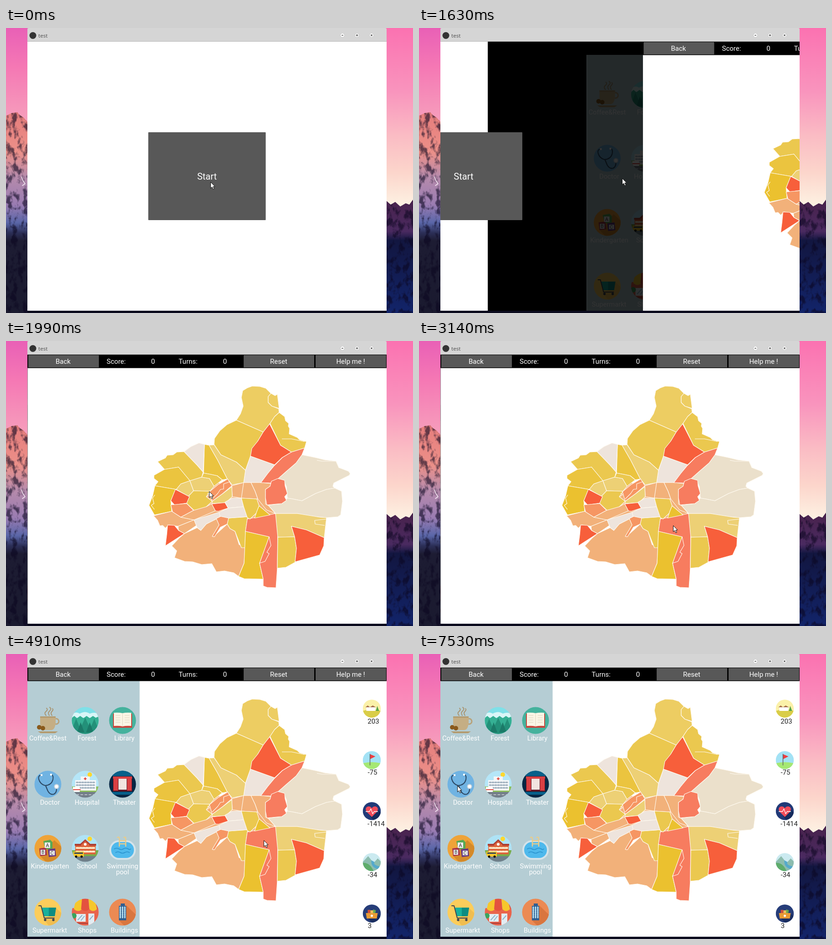
These frames come from a looping animation (894x626 px, 8 s). An HTML page:

```html
<!DOCTYPE html>
<html lang="en">
<head>
<meta charset="utf-8">
<title>test</title>
<style>
@property --slide { syntax: '<number>'; inherits: true; initial-value: 0; }
@property --open { syntax: '<number>'; inherits: true; initial-value: 0; }
html, body { margin: 0; width: 100%; height: 100%; overflow: hidden; }
svg { display: block; width: 894px; height: 626px; animation: slide 8s step-end infinite, open 8s step-end infinite; }
text { font: 15px Roboto, sans-serif; text-anchor: middle; fill: #fff; }
.title { font: 11.5px 'Noto Sans', sans-serif; text-anchor: start; fill: #555; }
.big { font-size: 20px; }
.labels text { font-size: 14.7px; }
.stats text { fill: #222; }
.btn { fill: #585858; }
.disc { clip-path: url(#disc); }
.small { clip-path: url(#smallDisc); }
.line { fill: none; stroke-linecap: round; stroke-linejoin: round; }

.map path { stroke: #fffaf0; stroke-width: 1.15; stroke-linejoin: round; }
.a { fill: #edcd62 } .b { fill: #ebc84f } .c { fill: #ebc12f } .d { fill: #edd075 }
.e { fill: #f2b17a } .f { fill: #f75f3b } .g { fill: #f77c5f } .h { fill: #f69663 }
.i { fill: #eee4dc } .j { fill: #ebe0cb } .k { fill: #ebc43f } .seam { fill: none }

.startBack { transform: translateX(calc(var(--slide) * -1571px)); }
.startButton { transform: translateX(calc(var(--slide) * -788px)); }
.game { transform: translateX(calc((1 - var(--slide)) * 788px)); opacity: calc(var(--slide) * 1000); }
.drawer { transform: translateX(calc((var(--open) - 1) * 123px)); }
.shade { opacity: calc((1 - var(--open)) * .8); }
.page { transform: translateX(calc(var(--open) * 246px)); }
.press { animation: press 8s step-end infinite; }
.bubble { animation: bubble 8s step-end infinite; }
.stats { animation: stats 8s step-end infinite; }
.cursor { animation: cursor 8s step-end infinite; }

@keyframes slide {
  0% { --slide: 0 } 19.375% { --slide: .0975 } 20.375% { --slide: .436 } 21.375% { --slide: .6975 }
  22.25% { --slide: .859 } 23.125% { --slide: .96 } 24% { --slide: .9994 } 24.875%, 100% { --slide: 1 }
}
@keyframes open {
  0% { --open: 0 } 56.625% { --open: .004 } 57.625% { --open: .51 } 58.625% { --open: .805 }
  59.5% { --open: .94 } 60.5% { --open: .994 } 61.375%, 100% { --open: 1 }
}
@keyframes press { 0% { fill: #585858 } 17.625% { fill: #32a4ce } 19.375%, 100% { fill: #585858 } }
@keyframes bubble { 0% { opacity: 0 } 41% { opacity: 1 } 57.625%, 100% { opacity: 0 } }
@keyframes stats { 0% { opacity: 0 } 57.625%, 100% { opacity: 1 } }
@keyframes cursor {
  0% { transform: translate(449px, 338px) }
  2.875% { transform: translate(470px, 322px) }
  3.75% { transform: translate(530px, 290px) }
  4.625% { transform: translate(590px, 283px) }
  5.625% { transform: translate(621px, 320px) }
  6.5% { transform: translate(615px, 375px) }
  7.375% { transform: translate(575px, 403px) }
  8.25% { transform: translate(535px, 400px) }
  13.125% { transform: translate(517px, 386px) }
  14% { transform: translate(490px, 362px) }
  14.875% { transform: translate(465px, 343px) }
  15.75% { transform: translate(450px, 333px) }
  16.625% { transform: translate(446px, 330px) }
  35.625% { transform: translate(452px, 336px) }
  36.5% { transform: translate(470px, 350px) }
  37.375% { transform: translate(500px, 372px) }
  38.375% { transform: translate(535px, 393px) }
  39.25% { transform: translate(558px, 405px) }
  40.125% { transform: translate(566px, 409px) }
  76.625% { transform: translate(560px, 418px) }
  77.5% { transform: translate(535px, 445px) }
  78.5% { transform: translate(495px, 478px) }
  79.375% { transform: translate(445px, 500px) }
  80.375% { transform: translate(385px, 508px) }
  81.25% { transform: translate(310px, 495px) }
  82.125% { transform: translate(235px, 452px) }
  83.125% { transform: translate(170px, 395px) }
  84% { transform: translate(120px, 335px) }
  85% { transform: translate(88px, 290px) }
  85.875% { transform: translate(72px, 271px) }
  86.875% { transform: translate(67px, 262px) }
  87.75% { transform: translate(66px, 260px) }
  88.625% { transform: translate(74px, 266px) }
  89.625% { transform: translate(88px, 276px) }
  90.5% { transform: translate(100px, 287px) }
  91.375% { transform: translate(103px, 296px) }
  92.25% { transform: translate(97px, 294px) }
  93.25% { transform: translate(89px, 291px) }
  94.125%, 100% { transform: translate(84px, 289px) }
}
</style>
</head>
<body>
<svg viewBox="0 0 894 626">
<defs>
  <clipPath id="disc"><circle r="29.5"/></clipPath>
  <clipPath id="smallDisc"><circle r="19.8"/></clipPath>
  <clipPath id="window"><path d="M47 30H836V621H47Z"/></clipPath>
  <linearGradient id="skyLeft" x2="0" y2="1"><stop stop-color="#e960b6"/><stop offset=".4" stop-color="#f578b4"/><stop offset="1" stop-color="#f6a2bd"/></linearGradient>
  <linearGradient id="skyRight" x2="0" y2="1"><stop stop-color="#fb72b1"/><stop offset=".35" stop-color="#f994bd"/><stop offset=".6" stop-color="#fabcc4"/><stop offset=".8" stop-color="#fcd5cb"/><stop offset="1" stop-color="#fdf3e4"/></linearGradient>
  <linearGradient id="rockLeft" x2="0" y2="1"><stop stop-color="#e67d7c"/><stop offset=".2" stop-color="#ec9089"/><stop offset=".32" stop-color="#b78bab"/><stop offset=".46" stop-color="#9a7cb2"/><stop offset=".55" stop-color="#5a66a8"/><stop offset=".6" stop-color="#2c2f58"/><stop offset=".64" stop-color="#1d1c33"/><stop offset="1" stop-color="#1a1a2f"/></linearGradient>
  <linearGradient id="rockRight" x2="0" y2="1"><stop stop-color="#49224c"/><stop offset=".28" stop-color="#4a2a60"/><stop offset=".36" stop-color="#121640"/><stop offset="1" stop-color="#12246a"/></linearGradient>
  <filter id="rough" x="0" y="0" width="1" height="1" color-interpolation-filters="sRGB">
    <feTurbulence type="fractalNoise" baseFrequency=".08 .05" numOctaves="4" seed="4"/>
    <feColorMatrix values="0 0 0 0 .04  0 0 0 0 .02  0 0 0 0 .12  5 0 0 0 -2.400"/>
    <feComposite in2="SourceGraphic" operator="in" result="cracks"/>
    <feComponentTransfer in="cracks" result="shadow"><feFuncA type="linear" slope=".6"/></feComponentTransfer>
    <feMerge><feMergeNode in="SourceGraphic"/><feMergeNode in="shadow"/></feMerge>
  </filter>
</defs>

<path fill="#0b0b1e" d="M0 0H894V626H0Z"/>
<path fill="url(#skyLeft)" d="M0 0H60V215H0Z"/>
<path fill="url(#skyRight)" d="M826 0H894V395H826Z"/>
<g filter="url(#rough)">
  <path fill="url(#rockLeft)" d="M0 193L12 187L25 185L30 191L39 197L47 206V626H0Z"/>
  <path fill="url(#rockRight)" d="M836 380L845 388L855 382L866 392L878 385L886 388L894 377V626H836Z"/>
</g>
<path class="line" stroke="#f4e6f2" stroke-width="1.600" d="M34 327L37 335L42 342L36 346"/>

<path fill="#d5d5d5" d="M47 30V3Q47 0 50 0H833Q836 0 836 3V30Z"/>
<path fill="#b9b9b9" d="M47 29H836V30H47Z"/>
<circle cx="59" cy="16.500" r="7.500" fill="#333"/>
<text class="title" x="71" y="21">test</text>
<g fill="#fff" stroke="#aaa" stroke-width=".5"><circle cx="739" cy="16" r="4.400"/><circle cx="771" cy="16" r="4.400"/><circle cx="803" cy="16" r="4.400"/></g>
<path class="line" stroke="#555" stroke-width="1.300" d="M737.500 16H740.500M769 16H773M771 14V18M801.700 14.700L804.300 17.300M804.300 14.700L801.700 17.300"/>

<g clip-path="url(#window)">
<path d="M47 30H836V621H47Z"/>
<path class="startBack" fill="#fff" d="M47 30H836V621H47Z"/>
<g class="startButton">
  <rect class="btn press" x="312.500" y="229" width="258" height="193" rx="1"/>
  <text class="big" x="441.500" y="332.500">Start</text>
</g>

<g class="game">
<g class="drawer">
  <path fill="#b5cdd4" d="M47 59H294V621H47Z"/>
  <g transform="translate(92 146)">
    <path class="line" stroke="#a8906a" stroke-width="1.800" d="M-4-11Q-9-16-4-20T-3-27M3-11Q-1-17 4-21T4-29M9-11Q5-16 9-20T10-26"/>
    <circle cx="18" cy="2" r="6" fill="none" stroke="#b8a27a" stroke-width="3"/>
    <path fill="#c5ae84" d="M-17-9H17V4Q16 20 8 21H-8Q-17 19-17 4Z"/><path fill="#b39b70" d="M-17-9H17V-6H-17ZM-22 24H22L16 28H-16Z"/>
    <g fill="#8a5a1c"><circle cx="-19" cy="15" r="5"/><circle cx="-11" cy="17" r="5"/></g>
  </g>
  <g class="disc" transform="translate(174 146)">
    <path fill="#7fe0e8" d="M-30-30H30V30H-30Z"/><path fill="#d9f6f7" d="M-30-13Q-20-21-12-15Q0-22 10-15Q22-20 30-13V-6H-30Z"/>
    <path fill="#35b094" d="M-30-5L-24-10L-18-5L-11-10L-4-5L3-10L10-5L17-10L23-6L30-9V30H-30Z"/>
    <path fill="#239079" d="M-30 22L-20-4L-11 18L0-6L11 18L20-4L30 22V30H-30Z"/>
    <path fill="#1b7a68" d="M-18 26L-10 4L-2 26ZM2 26L10 4L18 26Z"/>
  </g>
  <g class="disc" transform="translate(256 146)">
    <path fill="#45b29d" d="M-30-30H30V30H-30Z"/><path fill="#c9463d" d="M-21-15H21V16H-21Z"/>
    <path fill="#fbf6e6" d="M-19-17Q-8-18 0-16Q8-18 19-17V12Q8 11 0 13Q-8 11-19 12Z"/>
    <path class="line" stroke="#ddd3bc" d="M0-15V13M-15-11H-5M-15-6H-5M-15-1H-5M-15 4H-5M5-11H15M5-6H15M5-1H15M5 4H15"/>
  </g>
  <g class="disc" transform="translate(92 286)">
    <path fill="#70b3e2" d="M-30-30H30V30H-30Z"/>
    <path class="line" stroke="#2d4a66" stroke-width="2.200" d="M-15-20Q-22-19-20-11Q-17 0-6 3Q8 2 11-10Q13-20 7-21M-5 3Q-3 8 0 15Q5 24 13 22Q19 19 19 11"/>
    <circle cx="19" cy="5" r="4.500" fill="#fff" stroke="#c9d5de" stroke-width="2"/>
    <path fill="#fff" d="M-16-22H-12V-18H-16ZM5-23H9V-19H5Z"/>
  </g>
  <g class="disc" transform="translate(174 286)">
    <path fill="#b5e6f8" d="M-30-30H30V30H-30Z"/><circle cx="10" cy="-21" r="5" fill="#ffd72e"/>
    <path fill="#8fc05c" d="M-30 5H30V18H-30Z"/><path fill="#737e89" d="M-30 17H30V30H-30Z"/>
    <path fill="#f4f6f8" d="M-10-17H10V14H-10ZM-22-9H24V14H-22Z"/>
    <path class="line" stroke="#9aabba" stroke-width="3" stroke-dasharray="3 3" stroke-linecap="butt" d="M-19-4H22M-19 2H22M-19 8H22"/>
    <path fill="#e2483f" d="M-1-15H1V-13H3V-11H1V-9H-1V-11H-3V-13H-1Z"/>
    <path fill="#fff" d="M-27 6H-12V17H-27Z"/><path fill="#e2483f" d="M-27 11H-10V13H-27Z"/>
    <path class="line" stroke="#fff" stroke-dasharray="5 4" d="M-28 23H28"/>
  </g>
  <g class="disc" transform="translate(256 286)">
    <path fill="#062744" d="M-30-30H30V30H-30Z"/><path fill="#07608a" d="M-30-30H30V-18H-30ZM-30 17H30V23H-30Z"/>
    <path fill="#5c1726" d="M-21-15H21V16H-21Z"/><path fill="#f2e4e0" d="M-9-12H9V12H-9Z"/>
    <path fill="#d83f43" d="M-21-17H21V-12H-21ZM-20-12H-10V14H-20ZM10-12H20V14H10Z"/>
  </g>
  <g class="disc" transform="translate(92 427)">
    <path fill="#efa338" d="M-30-30H30V30H-30Z"/><path fill="#d58a29" d="M14-18L34 0V34H0L-16 18Z"/>
    <path fill="#58a955" d="M-10-16L5-19L10-14V1L-6 2Z"/><path fill="#a5364c" d="M-19 0L-4-2L-2 15L-17 17Z"/><path fill="#643984" d="M0 2L16 0L18 17L2 19Z"/>
    <path fill="#eee" d="M-7-13H5V-1H-7ZM-16 3H-6V14H-16ZM4 5H15V15H4Z"/>
    <text y="-3" x="-1" style="font-size:11px;fill:#333">A</text><text y="12" x="-11" style="font-size:10px;fill:#333">B</text><text y="14" x="9" style="font-size:10px;fill:#333">C</text>
  </g>
  <g class="disc" transform="translate(174 427)">
    <path fill="#aee3f6" d="M-30-30H30V30H-30Z"/><circle cx="10" cy="-21" r="5" fill="#ffd72e"/><path fill="#77ad4b" d="M-30 4H30V18H-30Z"/>
    <path fill="#dd653c" d="M-22-7H23V13H-22ZM-9-11L0-18L9-11V13H-9Z"/><path fill="#ad3f33" d="M-23-10H-9V-6H-23ZM9-10H24V-6H9ZM-11-10L0-20L11-10L9-8L0-16L-9-8Z"/>
    <path class="line" stroke="#fbe9c9" stroke-width="4" stroke-dasharray="4 3" stroke-linecap="butt" d="M-19-1H20M-19 7H20"/><circle cy="-9" r="3" fill="#fff"/>
    <path fill="#70808a" d="M-30 17H30V30H-30Z"/><path fill="#f9c72b" d="M-26 7H-3V18H-26Z"/><path fill="#394c5c" d="M-24 9H-5V12H-24Z"/>
    <circle cx="-20" cy="18" r="2.500"/><circle cx="-8" cy="18" r="2.500"/>
  </g>
  <g transform="translate(256 427)">
    <rect x="-29" y="-18" width="58" height="43" rx="21" fill="#d4e3ea"/><rect x="-25" y="-14" width="50" height="35" rx="17" fill="#4fb9ec"/>
    <path class="line" stroke="#2790cc" stroke-width="1.500" d="M-18 1Q-13-2-8 1T2 1T12 1T18 1M-15 9Q-10 6-5 9T5 9T15 9"/>
    <path class="line" stroke="#e8cc8a" stroke-width="2.500" d="M-7-5V-22Q-7-26-11-24M7-5V-22Q7-26 3-24M-7-17H7M-7-10H7"/>
  </g>
  <g class="disc" transform="translate(92 567)">
    <path fill="#fccd5b" d="M-30-30H30V30H-30Z"/><path fill="#f0bd50" d="M18-9L40 12V40H10L-8 17Z"/>
    <path fill="#18b09c" d="M-13-10H18L15 9H-9Z"/><path fill="#0d8c81" d="M2-10H18L15 9H2Z"/>
    <path class="line" stroke="#3d4450" stroke-width="2" d="M-20-14H-15L-8 13H14"/><circle cx="-6" cy="17" r="2.700" fill="#3d4450"/><circle cx="12" cy="17" r="2.700" fill="#3d4450"/>
  </g>
  <g class="disc" transform="translate(174 567)">
    <path fill="#e9644c" d="M-30-9H30V30H-30Z"/><path fill="#f6c72c" d="M-20-30H-7V-7Q-15 2-25-7ZM7-30H20L26-7Q17 2 9-7Z"/><path fill="#e4523f" d="M-7-30H7L9-7Q0 2-9-7ZM20-30H30V-7H26Z"/>
    <path fill="#e2edf3" d="M-20 4H1V21H-20ZM7 3H20V30H7Z"/><path class="line" stroke="#8cb3c9" stroke-width="2" d="M-16 17L-7 7M-9 18L-2 9M10 16L17 8"/>
    <circle cx="-25" cy="8" r="6" fill="#3aa45d"/><path fill="#b8443c" d="M-30 23H6V26H-30Z"/>
  </g>
  <g class="disc" transform="translate(256 567)">
    <path fill="#ec8a53" d="M-30-30H30V30H-30Z"/><path fill="#d9763f" d="M8-15L40 16V40H14L-8 18Z"/>
    <path fill="#315f91" d="M-4-19H5V-14H8V18H-8V-14H-4Z"/><path class="line" stroke="#b9e2f2" stroke-width="3" stroke-dasharray="3 2" stroke-linecap="butt" d="M-5-11V14M0-11V14M5-11V14"/>
  </g>
  <g class="labels">
    <text x="92" y="190">Coffee&amp;Rest</text><text x="178" y="190">Forest</text><text x="260" y="190">Library</text>
    <text x="96.500" y="331">Doctor</text><text x="178" y="331">Hospital</text><text x="260" y="331">Theater</text>
    <text x="96.500" y="471">Kindergarten</text><text x="178" y="471">School</text><text x="256" y="471">Swimming</text><text x="256" y="484">pool</text>
    <text x="96" y="612">Supermarkt</text><text x="178.500" y="612">Shops</text><text x="260" y="612">Buildings</text>
  </g>
  <path class="shade" d="M47 59H294V621H47Z"/>
</g>

<path class="page" fill="#fff" d="M47.500 59H836V621H47.500Z"/>
<path d="M47 30H836V59.500H47Z"/>
<g class="btn"><rect x="49" y="31" width="155" height="27"/><rect x="522" y="31" width="155" height="27"/><rect x="680" y="31" width="155" height="27"/></g>
<text x="125.500" y="50">Back</text><text x="242" y="50">Score:</text><text x="323" y="50">0</text><text x="400" y="50">Turns:</text><text x="481" y="50">0</text><text x="599" y="50">Reset</text><text x="757" y="50">Help me !</text>

<g class="map">
  <path class="e" d="M380 340L440 310L590 320L590 392L530 400L400 395Z"/>
  <path class="a" d="M506 174L515 160L521 143L517 124L520 109L530 103L541 99L558 100L571 104L582 115L576 122L576 135L584 143L599 149L600 157L590 166L580 181L565 200Z"/>
  <path class="a" d="M582 115L591 120L596 117L600 148L584 143L576 135L576 122Z"/>
  <path class="b" d="M600 157L612 166L614 175L621 181L620 187L623 192L622 204L640 212L645 217L660 221L656 235L627 244L603 229L580 181L590 166Z"/>
  <path class="b" d="M506 174L565 200L552 222L537 253L526 284L506 266L472 250L457 227L458 214L470 197L485 184Z"/>
  <path class="f" d="M579 182L603 229L627 244L607 256L590 272L537 253L540 236L553 220L565 200Z"/>
  <path class="i" d="M537 253L590 272L575 291L560 311L522 311L526 284Z"/>
  <path class="j" d="M650 250L670 254L684 257L700 261L725 264L731 278L752 286L756 291L754 295L720 312L718 319L722 323L704 326L680 335L650 351L630 347L618 345L616 320L609 305L597 303L615 287L637 268Z"/>
  <path class="j" d="M722 323L737 330L739 352L735 382L729 386L705 388L660 384L640 379L592 379L576 361L606 357L618 345L630 347L650 351L680 335L704 326Z"/>
  <path class="e" d="M538 311L560 311L582 313L580 320L570 326L570 358L577 362L592 379L572 371L553 347L547 330Z"/>
  <path class="g" d="M656 235L650 250L637 268L615 287L597 303L582 312L560 311L575 291L590 273L607 256L627 244Z"/>
  <path class="g" d="M570 326L580 319L583 308L597 302L612 306L613 318L618 335L612 342L616 350L606 357L573 360L570 345Z"/>
  <path class="d" d="M446 229L457 228L472 250L506 266L526 284L522 311L497 316L486 303L465 262Z"/>
  <path class="k" d="M436 227L446 229L465 262L486 303L475 305L464 296L450 293L434 290Z"/>
  <path class="i" d="M391 243L406 232L424 224L436 227L433 288L420 273Z"/>
  <path class="b" d="M333 265L350 257L354 251L367 250L375 244L391 243L420 273L433 288L430 299L404 307L384 283L379 277L348 282Z"/>
  <path class="k" d="M325 295L348 282L379 277L384 283L404 307L384 314L374 326L327 318L334 309L325 302Z"/>
  <path class="c" d="M327 318L374 326L362 351L364 374L326 382L314 361L322 340Z"/>
  <path class="d" d="M374 326L384 314L404 307L412 329L402 342Z"/>
  <path class="d" d="M404 307L430 299L447 302L457 319L448 330L412 329Z"/>
  <path class="b" d="M434 290L450 293L464 296L475 305L457 319L447 302L430 299Z"/>
  <path class="b" d="M395 347L412 329L448 330L440 342L453 352L440 364L424 373L412 371L397 357Z"/>
  <path class="f" d="M372 326L403 342L397 356L370 360L362 351Z"/>
  <path class="h" d="M362 360L397 357L412 372L384 387L366 376Z"/>
  <path class="e" d="M324 384L364 374L384 387L413 393L378 407L358 404L350 411L344 405L338 406L333 394Z"/>
  <path class="e" d="M384 387L412 372L440 364L452 357L460 373L413 393Z"/>
  <path class="f" d="M355 404L370 405L379 416L392 423L350 450L353 426Z"/>
  <path class="e" d="M378 407L413 393L423 402L392 423L379 416Z"/>
  <path class="e" d="M392 423L420 410L428 416L440 402L462 390L472 397L455 430L486 402L492 412L503 418L512 447L525 454L523 488L511 517L500 509L480 505L462 507L452 489L430 491L410 485L392 484L370 476L375 461L364 450L380 433Z"/>
  <path class="i" d="M413 393L468 376L472 386L440 402L428 416L420 410Z"/>
  <path class="h" d="M462 390L474 384L490 389L486 402L471 409L458 430L453 429L468 404Z"/>
  <path class="b" d="M489 389L531 386L526 418L525 454L517 454L503 418L492 412L486 402Z"/>
  <path class="c" d="M526 418L578 430L571 455L557 488L565 523L523 522L511 517L523 488Z"/>
  <path class="g" d="M530 391L592 379L597 393L596 498L593 542L573 541L565 538L565 523L557 488L578 430L526 418Z"/>
  <path class="d" d="M592 379L640 379L690 387L704 388L699 432L660 415L627 407L634 430L597 431Z"/>
  <path class="b" d="M597 431L634 430L638 455L635 486L615 497L596 499Z"/>
  <path class="f" d="M627 407L660 415L699 432L698 450L689 470L635 485L638 455L634 430Z"/>
  <path class="e" d="M496 318L522 311L538 311L547 330L553 347L517 345L497 342Z"/>
  <path class="h" d="M447 331L465 316L487 303L496 318L475 336L453 352Z"/>
  <path class="d" d="M453 352L475 336L496 320L497 342L483 355L453 357Z"/>
  <path class="f" d="M452 358L481 355L488 367L466 374L460 373Z"/>
  <path class="i" d="M481 354L497 345L517 345L522 364L488 367Z"/>
  <path class="i" d="M468 376L488 367L522 364L531 386L489 389L470 385Z"/>
  <path class="b" d="M517 345L551 347L556 362L550 378L536 391L530 388L522 364Z"/>
  <path class="c" d="M556 362L580 382L546 389L551 374Z"/>
  <path class="seam" d="M578 430L582 449L573 464L578 467L569 484L557 488M704 391L678 394L679 402L700 405M522 311L517 345M453 347L465 335L471 326L478 325L478 314L492 309M440 342L447 338L443 334M327 338L322 345L325 357L319 361L326 370M606 215L627 215L656 221M683 262L694 264L725 264L732 279"/>
</g>

<g class="stats">
  <g class="small" transform="translate(803.500 120)"><path fill="#fbf1a9" d="M-20-20H20V20H-20Z"/><path fill="#d9cd48" d="M-20 5Q0-2 20 5V20H-20Z"/><path fill="#fff" d="M-12-3H8V5H-12Z"/><path fill="#a7704c" d="M-14-3L-9-7L-4-3L2-7L9-3Z"/><path fill="#58a348" d="M9 5L12-6L16 5Z"/></g>
  <g class="small" transform="translate(803.500 233)"><path fill="#a3e2f5" d="M-20-20H20V20H-20Z"/><path fill="#a5e873" d="M-20 7Q0 2 20 7V20H-20Z"/><path fill="#ef3e41" d="M-4-13L8-8L-4-2Z"/><path class="line" stroke="#666" stroke-width="1.500" d="M-4-13V11"/></g>
  <g class="small" transform="translate(803.500 345)"><path fill="#213a78" d="M-20-20H20V20H-20Z"/><path fill="#152b5d" d="M12-5L25 10V25H6L-4 10Z"/><path fill="#f14b59" d="M0 13L-12 1Q-16-7-9-10Q-3-11 0-6Q3-11 9-10Q16-7 12 1Z"/><path class="line" stroke="#fff" stroke-width="1.300" d="M-13 1H-5L-2-5L2 6L5 1H13"/></g>
  <g class="small" transform="translate(803.500 457)"><path fill="#cbeaf0" d="M-20-20H20V20H-20Z"/><path fill="#8cbcae" d="M-20 0L-8-13L4 2L13-8L20-1V20H-20Z"/><path fill="#5fac6c" d="M-20 2Q-5 0 4 20H-20Z"/><path fill="#55a9cc" d="M-1-4L6 0Q2 7 20 10V17Q-3 14-1-4Z"/></g>
  <g class="small" transform="translate(803.500 570)"><path fill="#263d79" d="M-20-20H20V20H-20Z"/><path fill="#192d60" d="M12 0L25 12V25H5L-9 10Z"/><path fill="#ce503d" d="M-9-8H-3V2H-9Z"/><path fill="#68a84c" d="M3-9L9-7L7 2H1Z"/><path fill="#eebd58" d="M-3-7H3V2H-3Z"/><path fill="#e99b35" d="M-13-1H13L11 11H-11Z"/><circle cy="5" r="2.500" fill="#fff"/></g>
  <text x="807" y="153">203</text><text x="805" y="265">-75</text><text x="813" y="378">-1414</text><text x="805" y="490">-34</text><text x="799" y="602">3</text>
</g>
<g class="bubble">
  <path fill="#b2b2b2" d="M52 523H142Q146 523 146 527V607Q146 611 142 611H105L97 620.500L88 611H52Q48 611 48 607V527Q48 523 52 523Z"/>
  <text x="96" y="572">Randwyck</text>
</g>
</g>
</g>

<path class="cursor" fill="#fff" stroke="#111" stroke-width="1" d="M.5.5V14L3.700 11L6 16.300L8.300 15.300L6 10.200H10Z"/>
</svg>
</body>
</html>
```
